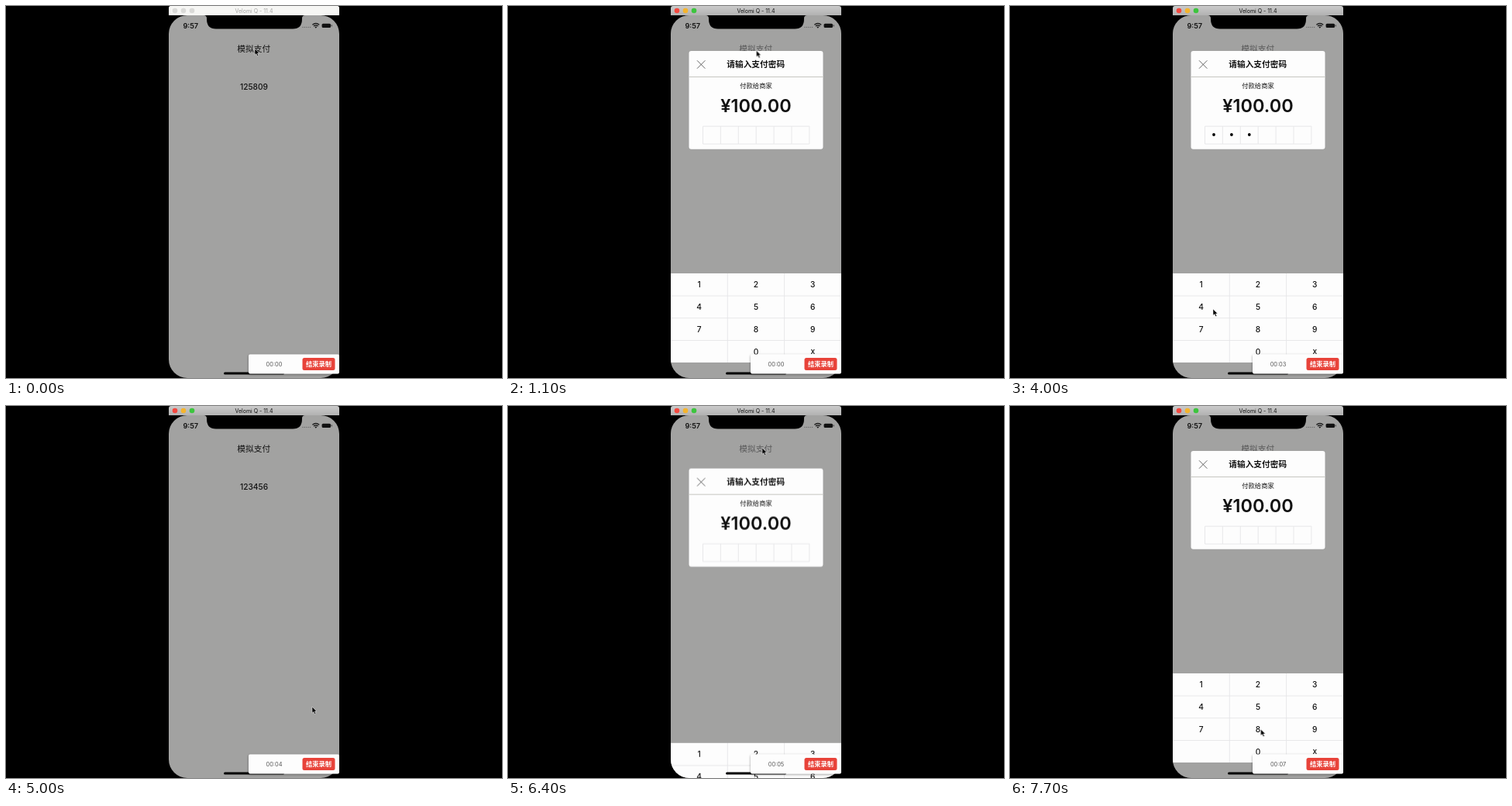
An HTML page that plays this animation: 640 px wide and 480 px high, repeating every 8 s.

```html
<!DOCTYPE html>
<html lang="zh-CN">
<head>
<meta charset="utf-8">
<title>模拟支付</title>
<style>
  html, body { margin: 0; width: 100%; height: 100%; overflow: hidden; background: #000; }
  svg { display: block; width: 100vw; height: 100vh; }
  text {
    font: 500 10.2px Inter, "Noto Sans CJK SC", "Noto Sans CJK", sans-serif;
    fill: #111; text-anchor: middle;
  }
  .cjk { font-size: 10.7px; font-weight: 400; }
  .bold { font-weight: 600; }
  .small { font-size: 8.3px; }
  .paper { fill: #fdfdfd; }
  .screen { fill: #a2a2a1; }
  .rule { fill: none; stroke: #e6e6e8; stroke-width: .9; }

  .anim { animation: 8s infinite; }
  .hard { animation-timing-function: step-end; }

  /* window focus */
  .idle { animation-name: idle; }
  @keyframes idle { 0% { opacity: 1 } 3.75%, 100% { opacity: 0 } }

  /* payment sheet */
  .sheet { animation-name: fade; animation-timing-function: linear; }
  @keyframes fade {
    0%, 4.3% { opacity: 0 }
    5.3%, 59% { opacity: 1 }
    61.2%, 77.4% { opacity: 0 }
    78.4%, 100% { opacity: 1 }
  }
  .slide { animation-name: slide; animation-timing-function: ease-in-out; }
  .card { --drop: 34px; }
  .keys { --drop: 135px; }
  @keyframes slide {
    0%, 4.375% { transform: translateY(var(--drop)) }
    10.625%, 58.9% { transform: none }
    61.3%, 77.5% { transform: translateY(var(--drop)) }
    83.75%, 100% { transform: none }
  }

  /* uncovers one dot per digit */
  .cover { animation-name: cover; transform-box: fill-box; transform-origin: right; }
  @keyframes cover {
    0% { transform: scaleX(1) }
    28.75% { transform: scaleX(.8333) }
    35.6% { transform: scaleX(.6667) }
    42.5% { transform: scaleX(.5) }
    52.2% { transform: scaleX(.3333) }
    55.6% { transform: scaleX(.1667) }
    58.2% { transform: scaleX(0) }
    62%, 100% { transform: scaleX(1) }
  }

  .before { animation-name: before; }
  .after { animation-name: after; }
  @keyframes before { 0% { opacity: 1 } 58.5%, 100% { opacity: 0 } }
  @keyframes after { 0% { opacity: 0 } 58.5%, 100% { opacity: 1 } }

  /* pointer */
  .pointer { animation-name: roam; animation-timing-function: ease-in-out; }
  @keyframes roam {
    0%, 13% { transform: translate(321px, 55px) }
    25%, 28.7% { transform: translate(255.5px, 358px) }
    34%, 36% { transform: translate(325px, 359px) }
    41%, 43% { transform: translate(396px, 360px) }
    50%, 52.4% { transform: translate(262px, 391px) }
    54.8%, 55.8% { transform: translate(325px, 390px) }
    57.6%, 66% { transform: translate(395px, 388px) }
    74.5%, 82% { transform: translate(328px, 54px) }
    91%, 100% { transform: translate(323.5px, 417px) }
  }
  .ring { animation-name: press; }
  @keyframes press {
    0%, 4%, 28.75%, 35.8%, 42.7%, 52.3%, 55.7%, 58.5%, 77.5%, 100% { opacity: 0 }
    2.5%, 27.2%, 34.3%, 41.2%, 51.2%, 54.8%, 57.6%, 76.2% { opacity: 1 }
  }

  /* recording timer, one 12px line per second */
  .timer { animation-name: tick; }
  .timer text { fill: #555; font-size: 7.4px; font-weight: 400; }
  @keyframes tick {
    0% { transform: none }
    19.4% { transform: translateY(-12px) }
    31.9% { transform: translateY(-24px) }
    44.4% { transform: translateY(-36px) }
    56.9% { transform: translateY(-48px) }
    69.4% { transform: translateY(-60px) }
    81.9% { transform: translateY(-72px) }
    94.4%, 100% { transform: translateY(-84px) }
  }
</style>
</head>
<body>
<svg viewBox="0 0 640 480">
  <defs>
    <clipPath id="phone"><rect x="210" y="12" width="220" height="468" rx="24"/></clipPath>
    <clipPath id="line"><rect x="320" y="456" width="52" height="12"/></clipPath>
    <linearGradient id="bar" x2="0" y2="1">
      <stop stop-color="#cacaca"/><stop offset="1" stop-color="#b2b2b2"/>
    </linearGradient>
    <filter id="shade" x="-10%" y="-30%" width="120%" height="160%">
      <feDropShadow dx="0" dy="1" stdDeviation="1.8" flood-opacity=".4"/>
    </filter>
  </defs>
  <rect width="640" height="480"/>

  <!-- title bar -->
  <path d="M210 12V3q0-3 3-3h214q3 0 3 3v9z" fill="url(#bar)"/>
  <circle cx="218" cy="6" r="3.3" fill="#f4483f"/>
  <circle cx="229" cy="6" r="3.3" fill="#f5b42c"/>
  <circle cx="240" cy="6" r="3.3" fill="#3cc53e"/>
  <text x="320" y="6" dy=".36em" style="font-size:7px;font-weight:400">Velomi Q - 11.4</text>
  <g class="anim hard idle">
    <path d="M210 12V3q0-3 3-3h214q3 0 3 3v9z" fill="#f6f6f4"/>
    <g fill="#dadad8">
      <circle cx="218" cy="6" r="3.3"/><circle cx="229" cy="6" r="3.3"/><circle cx="240" cy="6" r="3.3"/>
    </g>
    <text x="320" y="6" dy=".36em" style="font-size:7px;font-weight:400;fill:#a6a6a4">Velomi Q - 11.4</text>
  </g>

  <g clip-path="url(#phone)">
    <rect class="screen" x="210" y="12" width="220" height="468"/>
    <text class="cjk" x="319.7" y="55" dy=".36em">模拟支付</text>
    <text class="anim hard before" x="320" y="104" dy=".36em">125809</text>
    <text class="anim hard after" x="320" y="104" dy=".36em">123456</text>

    <g class="anim sheet">
      <rect class="screen" x="210" y="12" width="220" height="468" opacity=".5"/>
      <g class="anim slide card">
        <rect class="paper" x="233.5" y="58" width="173" height="126.7" rx="3"/>
        <path d="M233.5 91.5h173" stroke="#c6c6c0"/>
        <path d="M244 70.3l10.4 10.4m0-10.4L244 80.7" stroke="#555" stroke-width=".9"/>
        <text class="cjk bold" x="319.7" y="75.3" dy=".36em">请输入支付密码</text>
        <text class="cjk small" x="320" y="103" dy=".36em">付款给商家</text>
        <text class="bold" x="320" y="129" dy=".36em" style="font-size:23.5px">¥100.00</text>
        <path d="M263 166h114.6" stroke="#000" stroke-width="3.8" stroke-linecap="round" stroke-dasharray="0 22.9"/>
        <rect class="paper anim hard cover" x="251.5" y="155" width="137.4" height="23"/>
        <path class="rule" d="M251.5 155.2h137.4v22.8H251.5zM274.4 155v23m22.9-23v23m22.9-23v23m22.9-23v23m22.9-23v23"/>
      </g>
      <g class="anim slide keys">
        <rect class="paper" x="210" y="345" width="220" height="115"/>
        <path class="rule" d="M210 374h220M210 402.7h220M210 431.5h220M283.3 345v115M356.6 345v115"/>
        <text x="246.7" y="359.5" dy=".36em">1</text>
        <text x="320" y="359.5" dy=".36em">2</text>
        <text x="393.3" y="359.5" dy=".36em">3</text>
        <text x="246.7" y="388.3" dy=".36em">4</text>
        <text x="320" y="388.3" dy=".36em">5</text>
        <text x="393.3" y="388.3" dy=".36em">6</text>
        <text x="246.7" y="417.2" dy=".36em">7</text>
        <text x="320" y="417.2" dy=".36em">8</text>
        <text x="393.3" y="417.2" dy=".36em">9</text>
        <text x="320" y="446" dy=".36em">0</text>
        <text x="393.3" y="446" dy=".3em">x</text>
      </g>
    </g>

    <!-- status bar and home indicator -->
    <path d="M255 12q4 0 4 4v1q0 12.5 12 12.5h99q12 0 12-12.5v-1q0-4 4-4z"/>
    <text class="bold" x="238.3" y="25.2" dy=".36em" style="font-size:9.2px">9:57</text>
    <path d="M383 27.4h10" stroke="#666" stroke-width="1.3" stroke-linecap="round" stroke-dasharray="0 2.4"/>
    <path d="M395.4 24.2q4.4-3.6 8.8 0M397 26q2.8-2.3 5.6 0" fill="none" stroke="#111" stroke-width="1.3"/>
    <path d="M398.3 27.1q1.5-1.2 3 0l-1.5 1.6z" fill="#111"/>
    <rect x="407.6" y="22.7" width="11.4" height="5.4" rx="1.5" fill="#111"/>
    <path d="M420.2 24.4v2" stroke="#333"/>
    <rect x="281" y="472.5" width="78" height="3" rx="1.5"/>
  </g>

  <!-- recorder -->
  <rect x="313" y="449.5" width="117" height="25" rx="2" class="paper" filter="url(#shade)"/>
  <g clip-path="url(#line)">
    <g class="anim hard timer">
      <text x="346" y="462" dy=".36em">00:00</text>
      <text x="346" y="474" dy=".36em">00:01</text>
      <text x="346" y="486" dy=".36em">00:02</text>
      <text x="346" y="498" dy=".36em">00:03</text>
      <text x="346" y="510" dy=".36em">00:04</text>
      <text x="346" y="522" dy=".36em">00:05</text>
      <text x="346" y="534" dy=".36em">00:06</text>
      <text x="346" y="546" dy=".36em">00:07</text>
    </g>
  </g>
  <rect x="382.5" y="454" width="42" height="16" rx="2.5" fill="#e8433a"/>
  <text class="cjk bold small" x="403.5" y="462" dy=".36em" style="fill:#fff">结束录制</text>

  <g class="anim pointer">
    <circle class="anim hard ring" cx=".3" cy=".5" r="12" fill="none" stroke="#222" stroke-width="1.2"/>
    <path d="M0 0v8.2l1.9-1.6 1.4 3 1.5-.7-1.4-2.9h2.5z" stroke="#fff" stroke-width=".5"/>
  </g>
</svg>
</body>
</html>
```
